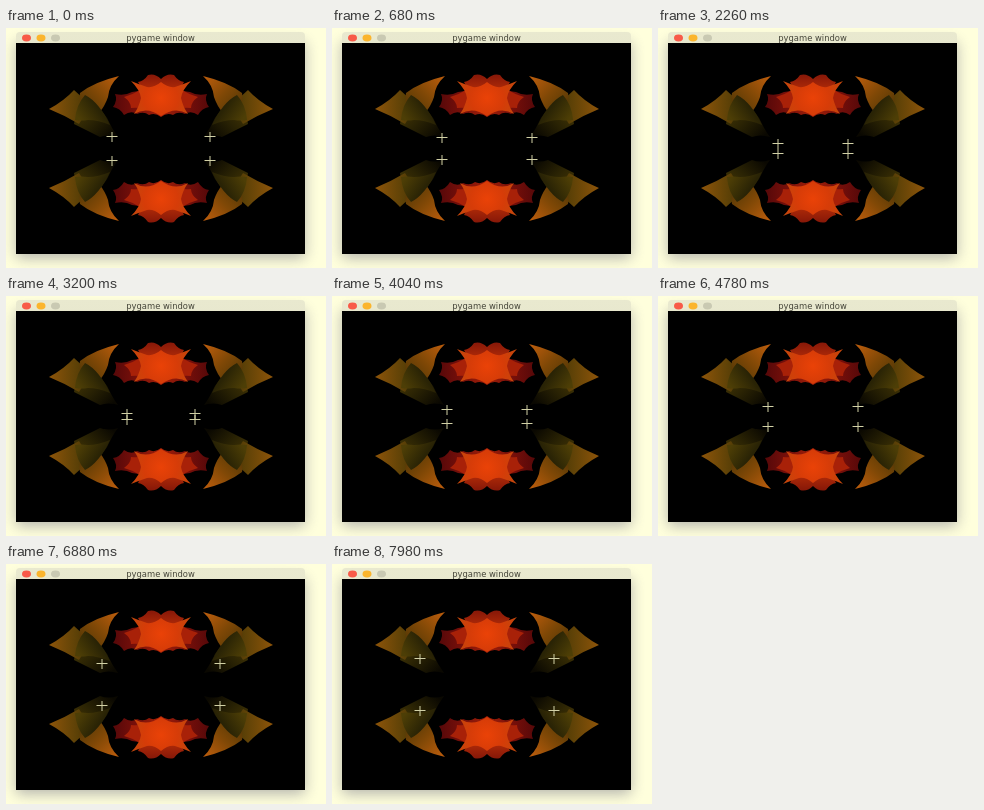
An HTML page for the animation above (8 s loop, 320x240 px).

```html
<!DOCTYPE html>
<html lang="en">
<head>
<meta charset="utf-8">
<style>
  html, body { margin: 0; width: 100%; height: 100%; overflow: hidden; background: #ffffdc; }
  svg { display: block; width: 100vw; height: 100vh; }
</style>
</head>
<body>
<svg viewBox="0 0 320 240">
  <defs>
    <filter id="blur" x="-20%" y="-20%" width="140%" height="140%"><feGaussianBlur stdDeviation="7"/></filter>
    <linearGradient id="bar" x2="0" y2="1">
      <stop stop-color="#e9e9cf"/><stop offset="1" stop-color="#d8d8c0"/>
    </linearGradient>
    <linearGradient id="gold" gradientUnits="userSpaceOnUse" x1="111" y1="50" x2="73" y2="88">
      <stop stop-color="#b95c0c"/><stop offset=".45" stop-color="#804806"/><stop offset="1" stop-color="#453205"/>
    </linearGradient>
    <linearGradient id="leaf" gradientUnits="userSpaceOnUse" x1="45" y1="81" x2="84" y2="81">
      <stop stop-color="#8a5309"/><stop offset=".6" stop-color="#614307"/><stop offset="1" stop-color="#463605"/>
    </linearGradient>
    <linearGradient id="olive" gradientUnits="userSpaceOnUse" x1="72" y1="74" x2="106" y2="108">
      <stop stop-color="#4a3a05"/><stop offset=".5" stop-color="#2a2304"/><stop offset="1" stop-color="#0a0801"/>
    </linearGradient>
    <linearGradient id="pod" gradientUnits="userSpaceOnUse" x1="70" y1="86" x2="88" y2="74">
      <stop stop-color="#4d3e06"/><stop offset="1" stop-color="#292305"/>
    </linearGradient>
    <linearGradient id="wing" gradientUnits="userSpaceOnUse" x1="107" y1="0" x2="155" y2="0">
      <stop stop-color="#560809"/><stop offset=".5" stop-color="#7a100a"/><stop offset="1" stop-color="#a02008"/>
    </linearGradient>
    <linearGradient id="lobe" gradientUnits="userSpaceOnUse" x1="0" y1="46" x2="0" y2="64">
      <stop stop-color="#851708"/><stop offset="1" stop-color="#b52d08"/>
    </linearGradient>
    <radialGradient id="fire" gradientUnits="userSpaceOnUse" cx="155" cy="70" r="34">
      <stop stop-color="#ea4207"/><stop offset=".5" stop-color="#d63c08"/><stop offset="1" stop-color="#c0480c"/>
    </radialGradient>

    <g id="art">
      <path fill="url(#olive)" d="M74 67 Q93 76 101 90 Q106 101 112 109 Q102 106 94 109 Q84 104 68 96 Q71 80 74 67Z"/>
      <path fill="url(#leaf)" d="M43 81 Q58 73 68 62 Q73 67 80 72 Q80 87 73 96 Q58 87 43 81Z"/>
      <path fill="url(#gold)" d="M113 48 Q103 57 102 69 Q99 78 93 85 Q85 78 77 83 Q72 74 74 65 Q88 54 113 48Z"/>
      <path fill="url(#pod)" d="M79 67 Q93 74 104 97 Q92 92 82 92 Q75 93 69 92 Q70 77 79 67Z"/>
      <path fill="url(#wing)" d="M155 60 L126 64 Q119 68 109 66 Q112 72 107 79 Q114 80 118 87 Q125 82 131 86 Q138 83 143 87 Q149 84 155 89Z"/>
      <path fill="url(#lobe)" d="M155 51 Q149 45 142 47 Q138 53 132 54 Q136 64 155 66Z"/>
      <path fill="#a82108" d="M134 62 Q126 67 118 69 Q125 74 125 80 Q139 78 155 88 V62Z"/>
      <path fill="url(#fire)" d="M155 54 Q148 60 141 59 Q132 56 125 53 Q134 62 135 70 Q133 79 128 86 Q141 78 155 88Z"/>
    </g>
    <path id="cross" d="M-5 0H6M.5 -4.5V5.5" fill="none" stroke="#d2d1a6"/>
    <g id="halfArt"><use href="#art"/><use href="#art" transform="matrix(-1 0 0 1 310 0)"/></g>
  </defs>

  <rect width="320" height="240" fill="#ffffdc"/>
  <rect x="10" y="14" width="289" height="216" rx="4" fill="#65657c" opacity=".48" filter="url(#blur)"/>
  <path d="M10 225V8Q10 4 14 4H295Q299 4 299 8V225Z" fill="url(#bar)"/>
  <g>
    <ellipse cx="20.5" cy="10" rx="4.5" ry="3.4" fill="#f85a48"/>
    <ellipse cx="35" cy="10" rx="4.5" ry="3.4" fill="#fbb52d"/>
    <ellipse cx="49.5" cy="10" rx="4.5" ry="3.4" fill="#c9c9b2"/>
  </g>
  <text x="154.5" y="13" text-anchor="middle" font-family="'DejaVu Sans', sans-serif" font-size="8.4" fill="#444438">pygame window</text>
  <rect x="10" y="15" width="289" height="211" fill="#000"/>
  <use href="#halfArt"/>
  <use href="#halfArt" transform="matrix(1 0 0 -1 0 241)"/>
  <g id="pointers"></g>
</svg>
<script>
  const LOOP = 8000;
  // time, x, y of the upper-left pointer; the others mirror it
  const path = [
    [0, 106, 108], [1380, 115, 110.5], [2550, 121, 116.5], [3200, 121, 117],
    [4780, 110, 110], [5860, 103, 104], [6880, 96, 99], [8000, 88, 94]
  ];
  const pointers = document.getElementById('pointers');
  const crosses = [0, 1, 2, 3].map(() => {
    const cross = document.createElementNS('http://www.w3.org/2000/svg', 'use');
    cross.setAttribute('href', '#cross');
    return pointers.appendChild(cross);
  });

  function positionAt(time) {
    const next = path.findIndex(key => key[0] > time);
    const [t0, x0, y0] = path[next - 1];
    const [t1, x1, y1] = path[next];
    const k = (time - t0) / (t1 - t0);
    return [Math.round(x0 + (x1 - x0) * k), Math.round(y0 + (y1 - y0) * k)];
  }

  function draw() {
    const [x, y] = positionAt(performance.now() % LOOP);
    crosses.forEach((cross, i) => {
      const px = i & 1 ? 310 - x : x;
      const py = i & 2 ? 240 - y : y;
      cross.setAttribute('transform', `translate(${px - 0.5} ${py + 0.5})`);
    });
    requestAnimationFrame(draw);
  }
  draw();
</script>
</body>
</html>
```
